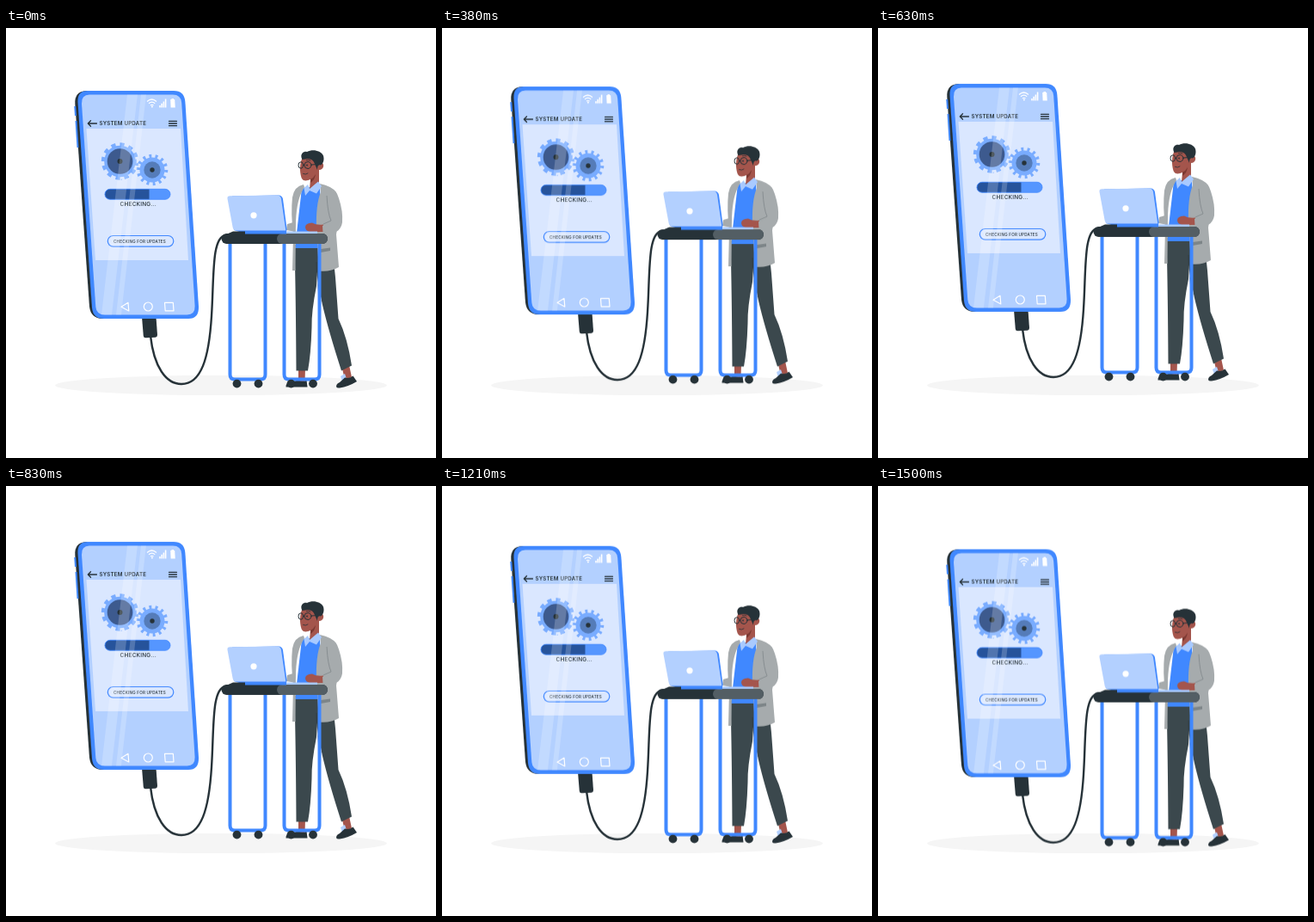
Write an HTML page that moves like this. It is 500 px wide and 500 px high and loops after 1.54 s.

```html
<!DOCTYPE html>
<html lang="en">
<head>
<meta charset="utf-8">
<title>System update</title>
<style>
  html, body { margin: 0; width: 100%; height: 100%; overflow: hidden; background: #fff; }
  svg { display: block; width: 100vw; height: 100vh; }
  text { font-family: Inter, "Open Sans", sans-serif; fill: #263238; letter-spacing: .2px; }

  /* Linear bob in 37 even steps: 17 up, one hold, 18 down, one hold */
  .float { animation: bob 1540ms -5ms infinite; }
  @keyframes bob {
    0% { transform: translateY(0); animation-timing-function: steps(17); }
    45.946% { transform: translateY(-9.19px); animation-timing-function: step-end; }
    48.649% { transform: translateY(-9.19px); animation-timing-function: steps(18); }
    97.297%, 100% { transform: translateY(.54px); }
  }

  .blue { fill: #4088ff; }
  .pale { fill: #b3d0ff; }
  .dark { fill: #263238; }
  .skin { fill: #a4554c; }
  .coat { fill: #a6abad; }
  .pants { fill: #3b484d; }
  .line { fill: none; stroke: #263238; stroke-linecap: round; stroke-linejoin: round; }
  .icon { fill: none; stroke: #fff; stroke-width: 1.2; stroke-linejoin: round; }
  .leg { fill: none; stroke: #4088ff; stroke-width: 4; }
  .teeth { fill: none; stroke: #79acff; stroke-width: 5; }
  .gear { fill: #79acff; }
</style>
</head>
<body>
<svg viewBox="0 0 500 500">
  <ellipse cx="250" cy="415.5" rx="193" ry="11.6" fill="#f5f5f5"/>

  <g class="float">
    <!-- cable -->
    <path class="line" stroke-width="2.4" d="M168 358C172 394 186 414 204 414C227 414 236 384 239 335C242 288 239 244 255 241"/>
    <path class="dark" d="M158 336H174.500L176 357Q176 359.500 173.500 359.700L162.500 360.300Q160 360.400 159.800 358Z"/>

    <!-- phone -->
    <path class="dark" d="M100 73H93Q79.500 74 80.300 88L97 324Q98.500 337.500 112 338H124Z"/>
    <path d="M80.200 91L81 102M81.500 108L83.500 139" fill="none" stroke="#4088ff" stroke-width="2"/>
    <path class="blue" d="M95 73H195Q207.500 73 208.400 86L224 324Q224.500 338 212 338H114Q101 338 100 325L83.500 86Q83 73 95 73Z"/>
    <path class="pale" d="M97 77.500H194Q203.500 77.500 204.200 87L219.600 323Q220 333.500 210.500 333.500H115Q105 333.500 104.300 324L88 88Q87.500 77.500 97 77.500Z"/>
    <path d="M93.500 117H203L212 270H104Z" fill="#dae7ff"/>

    <!-- status icons -->
    <g class="icon">
      <path d="M164 85.500Q169.500 80.500 175 85.500M166 87.800Q169.700 84.500 173.200 87.800M168 90Q169.800 88.500 171.500 90"/>
      <path d="M179 92.500V90M181.200 92.500V87.800M183.400 92.500V85.400M185.600 92.500V82.500" stroke-width="1.6"/>
    </g>
    <circle cx="169.900" cy="91.500" r="1" fill="#fff"/>
    <path d="M192.500 82H195V83H196.200L196.800 92.500H191.600L191.200 83H192.500Z" fill="#fff"/>

    <!-- header -->
    <path class="line" stroke-width="1.3" d="M105.500 111H95.300M98.500 107.800L95.300 111L98.500 114.200M189.500 108.300H198.500M189.500 111H198.500M189.500 113.700H198.500"/>
    <text x="108.500" y="113.300" font-size="6.2" font-weight="600">SYSTEM UPDATE</text>

    <!-- gears -->
    <circle class="teeth" cx="132.500" cy="155" r="19.200" pathLength="24" stroke-dasharray="1"/>
    <circle class="gear" cx="132.500" cy="155" r="18.300"/>
    <circle cx="132.500" cy="155" r="14.800" fill="#3d5a8e"/>
    <circle class="dark" cx="132.500" cy="155" r="3"/>
    <circle class="teeth" cx="170" cy="165" r="15.800" pathLength="28" stroke-dasharray=".8 1.2"/>
    <circle class="gear" cx="170" cy="165" r="14.500"/>
    <circle cx="170" cy="165" r="9.700" fill="#557cb9"/>
    <circle class="dark" cx="170" cy="165" r="2.700"/>

    <!-- progress -->
    <rect x="115" y="187.300" width="76" height="12" rx="6" fill="#5596ff"/>
    <path d="M166.500 187.300H121A6 6 0 0 0 121 199.300H166.500Z" fill="#26539b"/>
    <rect x="115" y="187.300" width="76" height="12" rx="6" fill="none" stroke="#4088ff" stroke-width=".8"/>
    <text x="132.500" y="207.300" font-size="6.5" font-weight="500">CHECKING...</text>
    <rect x="118.300" y="241.500" width="76.500" height="12.600" rx="6.300" fill="none" stroke="#4088ff" stroke-width="1.2"/>
    <text x="125" y="249.600" font-size="4.6" font-weight="500">CHECKING FOR UPDATES</text>

    <!-- navigation -->
    <g class="icon">
      <path d="M134 324.300L142 319.300L142.800 329Z"/>
      <circle cx="165.300" cy="324" r="5"/>
      <path d="M184.500 319.300H194.300L195 328.800H185.200Z"/>
    </g>

    <!-- glare -->
    <path d="M141 77.500H153L123 333.500H111ZM157 77.500H163L134 333.500H128Z" fill="#fff" opacity=".2"/>

    <!-- legs and shoes -->
    <path class="skin" d="M340 395H348L347.500 412H340ZM391 396L399 392L402 406L394 409Z"/>
    <path d="M389 405L394 402L396 408L391 411Z" fill="#b3d0ff"/>
    <path class="dark" d="M325.500 417.500Q325 412.500 331 411.500L340 409.500Q346 412 349.500 409.500L350.500 417.500ZM384 417Q384 413.500 388 412L394 406.500Q400 408 403.500 404.500L408 411Q398 417 388 418.500Q384.500 419 384 417Z"/>
    <path class="pants" d="M357 252H379L383 290L386.500 338Q397 360 402 392.500L390 398.500Q375 352 368 322Q361 290 357 252Z"/>
    <path class="pants" d="M335.500 252H362L361 300Q355 330 355.500 348Q354.500 380 351 398.500H337.500Q337 310 335.500 252Z"/>
    <path d="M361 272Q361 300 366 318" fill="none" stroke="#263238" stroke-width=".8" opacity=".6"/>

    <!-- torso -->
    <path class="blue" d="M344 186L365 184L368 256H336Z"/>
    <path class="coat" d="M346 182Q335 184 333 197Q331 215 334 240L333 282H336.500L337 225Q338 198 347 185Z"/>
    <path class="coat" d="M365 181Q379 184 384 191Q387 202 388 216L384 240L387 278Q377 284 364 282.500L361 235Q360 205 366 191Z"/>
    <path class="coat" d="M334 226L327 228L326 235L337 237Z"/>
    <path d="M366 257L377 255.500V259L366 261Z" fill="#7d8588"/>
    <path class="skin" d="M369 228.500Q361 229.500 356 226.500Q348 227 348 231.500Q348 235.500 353 237H369Z"/>
    <path class="coat" d="M372 188Q384 185 387 198Q392 213 391 226Q389 238 377 238.500H368.500L368 230L377 226Q372 206 372 188Z"/>
    <path d="M373 195Q374 215 378 224L369 228" fill="none" stroke="#858c8f" stroke-width=".9"/>

    <!-- head -->
    <path class="skin" d="M345 150C341.500 157 341 166 343.500 174C345 178.500 350 178 354 176L353 187L364 182V165C370 165 371 157 366 156L361 149Z"/>
    <path d="M354 176Q358 174 360 170Q359 177 354 180Z" fill="#7b3932"/>
    <path class="dark" d="M344.500 153C341 147 346 142.500 350 144C356 140.500 366 142 369 148.500C370.500 154 368.500 158 366 159.500C363 158.500 362 161 362 165L359 158Q357 152 351 152Z"/>
    <path class="line" stroke-width="1" d="M347 159.500Q346 158.500 345.500 159.500M355 159L363 158.500"/>
    <circle class="line" cx="351" cy="159.500" r="4"/>
    <ellipse class="line" cx="342.800" cy="159.500" rx="2.800" ry="3.700"/>
    <path class="line" stroke-width=".8" d="M345.500 169.500Q348.500 171 351 169M349.500 153.500Q352 152.500 354 154"/>
    <circle class="dark" cx="350" cy="159.500" r=".9"/>
    <path fill="#a9caff" d="M351 182L346.500 186L348 195L353 189L361 192.500L367 184L363 178.500L353 187Z"/>

    <!-- laptop -->
    <path class="blue" d="M263 195.500L317 194.500Q321 194.500 322 199L326.500 233Q327 238.500 323 238.500H276L265 235Z"/>
    <path class="pale" d="M260.500 195.300L315.500 194.500Q319 194.500 320 198.500L325.300 235.500H268Q264.500 235.500 263.700 232L257.500 198.500Q257 195.300 260.500 195.300Z"/>
    <circle cx="288" cy="217.800" r="3.600" fill="#fff"/>
    <path d="M326 236.500H362V239.500H326Z" fill="#a9caff"/>

    <!-- table -->
    <path class="leg" d="M260.500 249V403Q260.500 408.500 266 408.500H296Q301.500 408.500 301.500 403V249M323.500 249V403Q323.500 408.500 329 408.500H359Q364.500 408.500 364.500 403V249"/>
    <g class="dark">
      <circle cx="268.500" cy="413.600" r="4.900"/>
      <circle cx="293.500" cy="413.600" r="4.900"/>
      <circle cx="331.500" cy="413.600" r="4.900"/>
      <circle cx="357" cy="413.600" r="4.900"/>
      <rect x="250.500" y="239" width="123.500" height="12" rx="6"/>
      <path d="M264 236.500H278V240H256Z"/>
    </g>
    <path d="M321 239H368A6 6 0 0 1 368 251H321A6 6 0 0 1 321 239Z" fill="#535e64"/>
    <path class="blue" d="M278 237H326V239.600H278Z"/>
  </g>
</svg>
</body>
</html>
```
